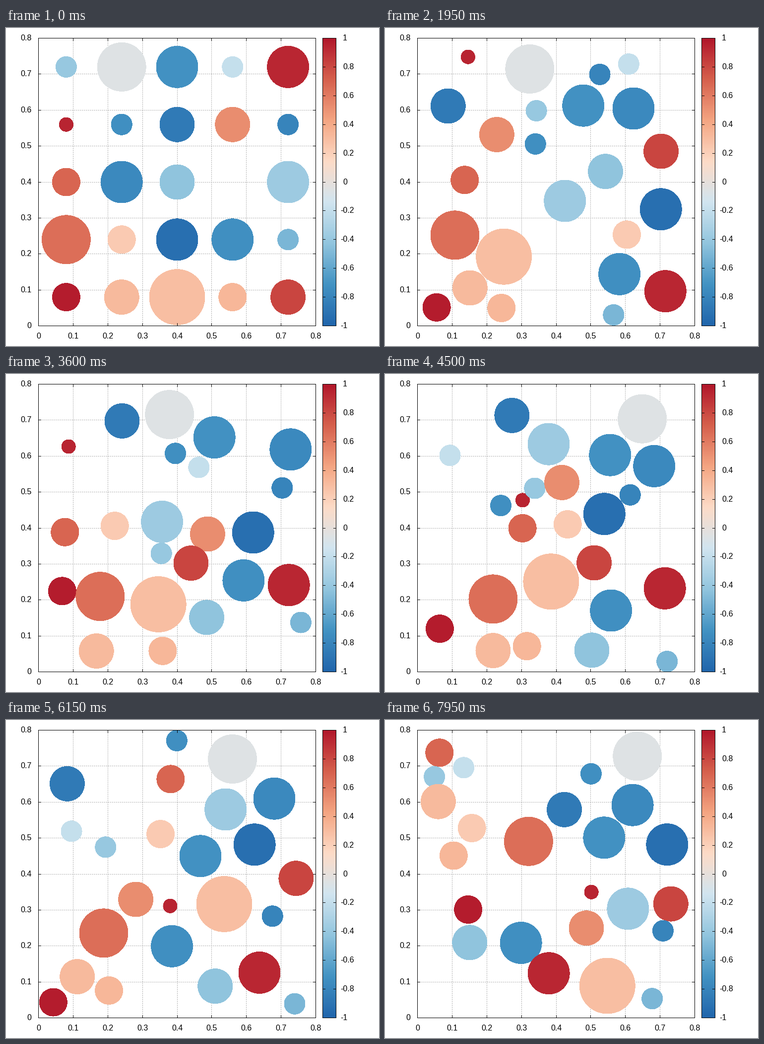
Animation, 752 px wide and 640 px high, one loop 8000 ms. Source, as a matplotlib script:

```python
import numpy as np
import matplotlib.pyplot as plt
from matplotlib.animation import FuncAnimation
from matplotlib.colors import LinearSegmentedColormap
from matplotlib.patches import Circle

W, H = 752, 640
LEFT, RIGHT, TOP, BOTTOM = 65.5, 624.5, 20.5, 599.5
BAR_LEFT, BAR_RIGHT = 638.5, 665.5
SIZE = 0.8
SCALE_X, SCALE_Y = (RIGHT - LEFT) / SIZE, (BOTTOM - TOP) / SIZE

INTERVAL, LOOP, HOLD = 50, 8000, 3
FRAMES = LOOP // INTERVAL
STEPS = -(-FRAMES // HOLD)
SUBSTEPS = 20
FREE_STEPS = 5  # the balls leave the lattice before they start to collide

plt.rcParams["font.family"] = "Liberation Sans"
cmap = LinearSegmentedColormap.from_list("blue_red", [
    "#2166AC", "#4393C3", "#92C5DE", "#D1E5F0",
    "#FDDBC7", "#F4A582", "#D6604D", "#B2182B"], N=256)

# Lattice columns, bottom to top:
# radius in hundredths, color value, drift in hundredths over the free steps
COLUMNS = [
    [(4, .98, -4, 1), (7, .65, 10, 6), (4, .69, 0, 17),
     (2, .95, -1, 11), (3, -.40, 5, 0)],
    [(5, .32, -11, 1), (4, .23, 17, -3), (6, -.78, 29, 6),
     (3, -.74, 3, 2), (7, -.06, -4, 1)],
    [(8, .29, -14, 5), (6, -.94, 19, 0), (5, -.43, -15, 4),
     (5, -.87, -25, 6), (6, -.72, -3, 0)],
    [(4, .33, -13, 2), (6, -.74, -25, 6), None,
     (5, .53, -31, 3), (3, -.20, 0, 3)],
    [(5, .82, -31, 53), (3, -.51, -23, -8), (6, -.38, -38, 13),
     (3, -.81, -3, -3), (6, .94, -1, -52)],
]


def px(x):
    return LEFT + x * SCALE_X


def py(y):
    return BOTTOM - y * SCALE_Y


def pixel(v):
    """Center of the pixel that holds v."""
    return np.floor(v) + 0.5


fig = plt.figure(figsize=(W / 72, H / 72), dpi=72, facecolor="white")
ax = fig.add_axes([0, 0, 1, 1])
ax.axis("off")


def line(xs, ys, **style):
    ax.plot(xs, ys, **{"color": "black", "lw": 1, "zorder": 5, "snap": False,
                       "solid_capstyle": "projecting", **style})


def tick(x, y, dx, dy):
    line([x, x + dx], [y, y + dy])


def label(x, y, value, align):
    ax.text(x, y, f"{value:g}", size=16, ha=align, va="baseline")


def box(x0, x1):
    line([x0, x1, x1, x0, x0], [TOP, TOP, BOTTOM, BOTTOM, TOP])


def draw_axes():
    grid = dict(color="#a0a0a0", zorder=1, dashes=(2, 2), dash_capstyle="butt")
    for i in range(9):
        v = i / 10
        x, y = pixel(px(v)), pixel(py(v))
        if 0 < i < 8:
            line([x, x], [BOTTOM, TOP], **grid)
            line([LEFT, RIGHT], [y, y], **grid)
            tick(x, BOTTOM, 0, -5)
            tick(x, TOP, 0, 5)
            tick(LEFT, y, 5, 0)
            tick(RIGHT, y, -5, 0)
        label(x, 625, v, "center")
        label(51.5, y + 4.5, v, "right")
    box(LEFT, RIGHT)


def draw_color_bar():
    ramp = np.linspace(1, 0, 256)[:, None]
    ax.imshow(ramp, cmap=cmap, vmin=0, vmax=1, aspect="auto", zorder=2,
              extent=(BAR_LEFT, BAR_RIGHT, BOTTOM, TOP))
    for i in range(-5, 6):
        v = i / 5
        y = pixel(BOTTOM - (v + 1) / 2 * (BOTTOM - TOP))
        tick(BAR_LEFT, y, 5, 0)
        tick(BAR_RIGHT, y, -5, 0)
        label(674.5 if v < 0 else 678.9, y + 4.5, v, "left")
    box(BAR_LEFT, BAR_RIGHT)


def make_balls():
    """Place a disc on each lattice point; return radii, places, velocities."""
    discs, radii, pos, vel = [], [], [], []
    for col, column in enumerate(COLUMNS):
        for row, spec in enumerate(column):
            if spec is None:
                continue
            radius, value, dx, dy = spec
            r = radius / 100 * SCALE_X
            center = px(0.08 + 0.16 * col), py(0.08 + 0.16 * row)
            discs.append(ax.add_patch(Circle(
                center, r, color=cmap((value + 1) / 2), lw=0,
                antialiased=False, zorder=3)))
            radii.append(r)
            pos.append(center)
            vel.append((dx * SCALE_X, -dy * SCALE_Y))
    return (discs, np.array(radii), np.array(pos),
            np.array(vel) / (100 * FREE_STEPS))


def collide(pos, vel, radii):
    """Elastic bounce for every touching pair that closes in."""
    delta = pos[:, None] - pos[None, :]
    dist = np.hypot(delta[..., 0], delta[..., 1])
    touching = np.triu(dist < radii[:, None] + radii[None, :], 1)
    mass = radii ** 2
    for i, j in np.argwhere(touching):
        normal = delta[i, j] / dist[i, j]
        closing = (vel[i] - vel[j]) @ normal
        if closing < 0:
            push = 2 * closing / (mass[i] + mass[j]) * normal
            vel[i] -= mass[j] * push
            vel[j] += mass[i] * push


def simulate(pos, vel, radii):
    low = np.stack([LEFT + radii, TOP + radii], axis=1)
    high = np.stack([RIGHT - radii, BOTTOM - radii], axis=1)
    track = [pos]
    for step in range(STEPS - 1):
        for _ in range(SUBSTEPS):
            pos = pos + vel / SUBSTEPS
            vel = np.where(pos < low, np.abs(vel), vel)
            vel = np.where(pos > high, -np.abs(vel), vel)
            pos = np.clip(pos, low, high)
            if step >= FREE_STEPS:
                collide(pos, vel, radii)
        track.append(pos)
    return track


draw_axes()
draw_color_bar()
ax.set_xlim(0, W)
ax.set_ylim(H, 0)
discs, radii, start, velocity = make_balls()
track = simulate(start, velocity, radii)


def update(frame):
    for disc, center in zip(discs, track[frame // HOLD]):
        disc.center = center
    return discs


anim = FuncAnimation(fig, update, frames=FRAMES, interval=INTERVAL,
                     repeat=True, repeat_delay=0)
plt.show()
```
